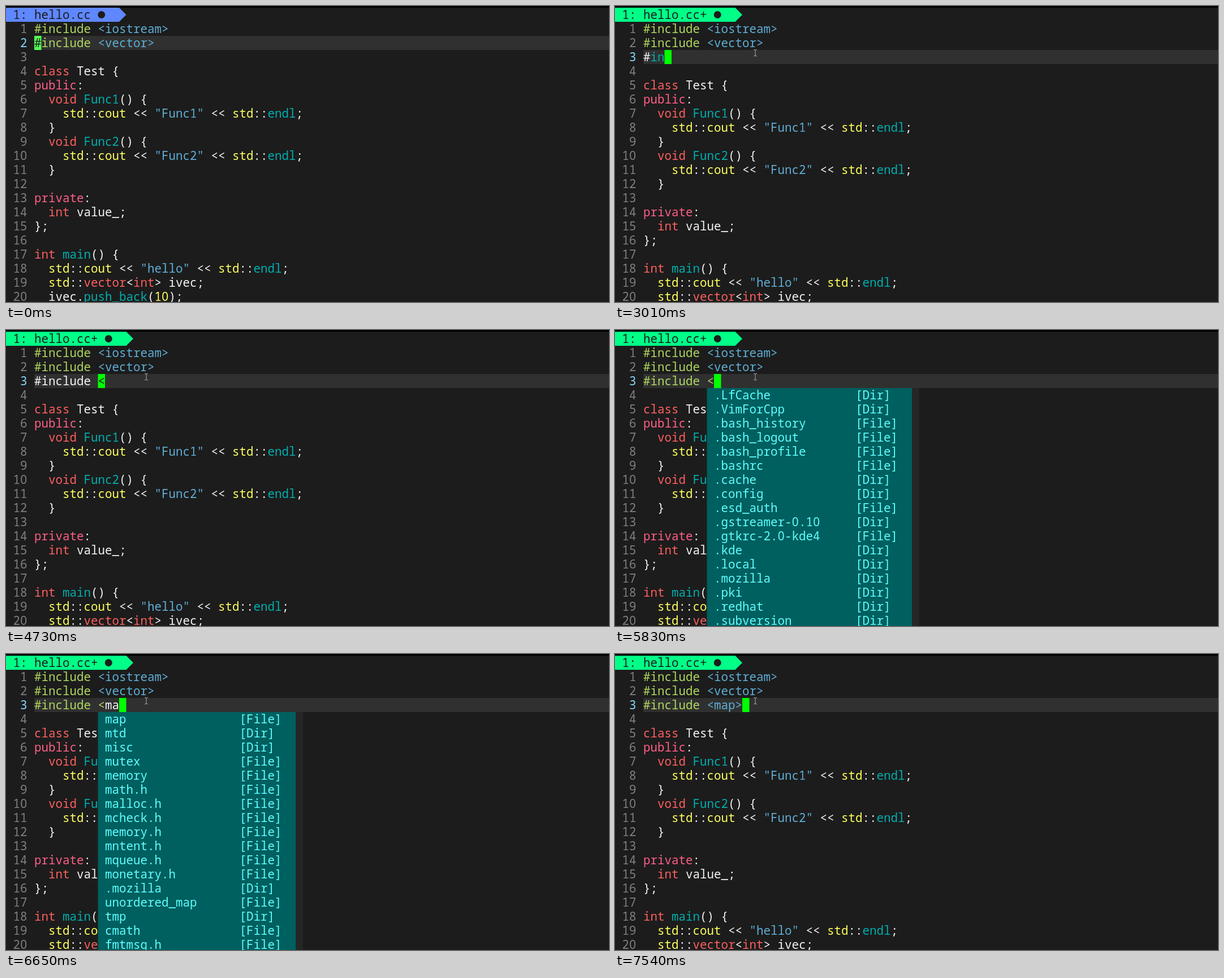
An HTML page with a canvas that plays this animation: 1066x525 px, repeating every 8000 ms.

```html
<!DOCTYPE html>
<html lang="en">
<head>
<meta charset="utf-8">
<title>Typing an include</title>
<style>
html, body { margin: 0; width: 100%; height: 100%; overflow: hidden; background: #1c1c1c; }
canvas { display: block; }
</style>
</head>
<body>
<canvas id="stage" width="1066" height="525"></canvas>
<script>
const ctx = document.getElementById('stage').getContext('2d', { alpha: false });
const CELL = 12.5, ROW = 25, TOP = 3, LOOP = 8000, GUTTER = 4;
const MONO = '20.83px "Noto Sans Mono", "DejaVu Sans Mono", monospace';
const PLAIN_ZERO = '20.83px "Noto Sans", "Open Sans", sans-serif';
const BG = '#1c1c1c', WHITE = '#f4f4f4', GREEN = '#afd75f', BLUE = '#5fafd7',
      RED = '#ff5f5f', PINK = '#ff5f87', YELLOW = '#ffff5f', TEAL = '#00afaf';

const code = `#include <iostream>
#include <vector>

class Test {
public:
  void Func1() {
    std::cout << "Func1" << std::endl;
  }
  void Func2() {
    std::cout << "Func2" << std::endl;
  }

private:
  int value_;
};

int main() {
  std::cout << "hello" << std::endl;
  std::vector<int> ivec;
  ivec.push_back(10);`.split('\n');

const rules = [
  [/^#include/, GREEN],
  [/^(<\w+>$|"[^"]*")/, BLUE],
  [/^(class|void|int|vector)\b/, RED],
  [/^(public|private)\b/, PINK],
  [/^(std|cout|10)\b/, YELLOW],
  [/^(Func\d|main|endl|push_back)\b/, TEAL],
  [/^(\w+|.)/, WHITE],
];

// Each line becomes a list of [text, colour] spans.
function highlight(line) {
  const spans = [];
  while (line) {
    const [rule, colour] = rules.find(([r]) => r.test(line));
    const text = line.match(rule)[0];
    spans.push([text, colour]);
    line = line.slice(text.length);
  }
  return spans;
}
const codeSpans = code.map(highlight);

function typedSpans(text, t) {
  if (text.endsWith('>')) return highlight(text);
  if (t >= 5750) return [[text.slice(0, 10), GREEN], [text.slice(10), WHITE]];
  if (text.length >= 8) return [[text, WHITE]];
  return [[text.slice(0, 1), WHITE], [text.slice(1), TEAL]];
}

// A trailing slash marks a directory.
const menu = (left, end, items, kind) => ({ left, end, kind, items: items.split(' ') });
const menus = {
  in: menu(4, 29, 'int include ivec main iostream private std::endl push_back', 'ID'),
  inclu: menu(4, 30, 'include include_next ifndef include_once', 'ID'),
  all: menu(13, 42, '.LfCache/ .VimForCpp/ .bash_history .bash_logout .bash_profile .bashrc ' +
    '.cache/ .config/ .esd_auth .gstreamer-0.10/ .gtkrc-2.0-kde4 .kde/ .local/ .mozilla/ ' +
    '.pki/ .redhat/ .subversion/'),
  m: menu(13, 41, 'map mtd/ misc/ mutex memory math.h malloc.h mcheck.h memory.h mntent.h ' +
    'mqueue.h monetary.h .mozilla/ unordered_map tmp/ cmath fmtmsg.h'),
  ma: menu(13, 41, 'map math.h malloc.h monetary.h .mozilla/ unordered_map cmath fmtmsg.h ' +
    'tgmath.h semaphore.h ctgmath cmalloc.h numa.h stdmath.h netmap.h pmap.h format.h'),
  map: menu(13, 40, 'map unordered_map semaphore.h netmap.h pmap.h'),
};

// [start time, text of the new line, open menu]
const steps = [
  [2060, ''], [2380, '#'], [2780, '#i'], [3010, '#in'], [3090, '#in', 'in'], [3170, '#inc'],
  [4030, '#incl'], [4180, '#inclu'], [4260, '#inclu', 'inclu'], [4340, '#includ'],
  [4420, '#include'], [4500, '#include '], [4730, '#include <'], [5750, '#include <'],
  [5830, '#include <', 'all'], [6440, '#include <m', 'all'], [6510, '#include <m', 'm'],
  [6650, '#include <ma', 'm'], [6760, '#include <ma', 'ma'], [6830, '#include <map', 'ma'],
  [6910, '#include <map', 'map'], [7540, '#include <map>'],
];

function box(col, row, cols, colour, rows = 1) {
  ctx.fillStyle = colour;
  ctx.fillRect(col * CELL, TOP + row * ROW, cols * CELL, rows * ROW);
}

function write(text, col, row, colour) {
  ctx.fillStyle = colour;
  [...text].forEach((ch, i) => {
    ctx.font = ch === '0' ? PLAIN_ZERO : MONO;
    ctx.fillText(ch, (col + i + 0.5) * CELL, TOP + row * ROW + 19.5);
  });
}

function writeSpans(spans, row) {
  let col = GUTTER;
  for (const [text, colour] of spans) {
    write(text, col, row, colour);
    col += text.length;
  }
}

function drawTab(edited) {
  const name = edited ? 'hello.cc+' : 'hello.cc', colour = edited ? '#00ff87' : '#5f87ff';
  const end = (GUTTER + name.length + 4) * CELL;
  ctx.fillStyle = colour;
  ctx.beginPath();
  ctx.moveTo(0, TOP);
  ctx.lineTo(end, TOP);
  ctx.lineTo(end + CELL, TOP + ROW / 2);
  ctx.lineTo(end, TOP + ROW);
  ctx.lineTo(0, TOP + ROW);
  ctx.fill();
  write('1: ' + name, 1, 0, BG);
  ctx.beginPath();
  ctx.arc(end - 2.5 * CELL, TOP + ROW / 2, 6.5, 0, 7);
  ctx.fill();
}

function drawMenu({ left, end, kind, items }, selected) {
  box(left, 4, end - left, '#005f5f', items.length);
  if (items.length > 16) box(end, 4, 1, '#262626', items.length);
  if (selected) box(left, 4, end - left, '#008787');
  items.forEach((item, i) => {
    const label = kind || (item.endsWith('/') ? 'Dir' : 'File');
    write(item.replace(/\/$/, ''), left + 1, 4 + i, '#5fffff');
    write(`[${label}]`, end - (kind ? 6 : 8), 4 + i, '#5fffff');
  });
}

function drawMouse(t) {
  if (t < 70) return;
  let x, y;
  if (t < 900) {
    const u = Math.min(10, Math.floor((t - 70) / 75)) / 10, k = u * (2 - u);
    x = 983 - 729 * k;
    y = 520 - 423 * k;
  } else {
    const n = Math.min(3, Math.floor((t - 820) / 80));
    x = 254 - 2 * n;
    y = 97 - 14 * n / 3;
  }
  ctx.strokeStyle = '#a8a8a8';
  ctx.lineWidth = 1;
  ctx.beginPath();
  for (const s of [-1, 1]) {
    ctx.moveTo(x - 3, y + 6 * s);
    ctx.quadraticCurveTo(x, y + 6 * s, x, y + 4 * s);
    ctx.quadraticCurveTo(x, y + 6 * s, x + 3, y + 6 * s);
  }
  ctx.moveTo(x, y - 5);
  ctx.lineTo(x, y + 5);
  ctx.stroke();
}

function drawCursor(t, edited, typed) {
  if (!edited) {
    const row = t < 1990 ? 2 : 3;
    box(GUTTER, row, 1, t < 1060 ? '#55ff55' : '#00ff00');
    if (row === 2) write('#', GUTTER, 2, BG);
    return;
  }
  // The bracket is echoed under the cursor before the cursor moves on.
  const lagging = t >= 4730 && t < 5750;
  const col = GUTTER + typed.length - lagging;
  box(col, 3, 1, '#00ff00');
  if (lagging) write('<', col, 3, BG);
}

function draw(t) {
  const step = steps.findLast(([start]) => t >= start);
  const edited = !!step, [, typed, open] = step || [];
  const lines = codeSpans.slice();
  if (edited) lines.splice(2, 0, typedSpans(typed, t));
  const current = edited ? 3 : 2;

  ctx.fillStyle = BG;
  ctx.fillRect(0, 0, 1066, 525);
  ctx.fillStyle = '#000';
  ctx.fillRect(0, 0, 1066, TOP);
  ctx.textAlign = 'center';
  drawTab(edited);
  box(GUTTER, current, 90, '#303030');
  lines.slice(0, 20).forEach((spans, i) => {
    const row = i + 1;
    write(String(row).padStart(3), 0, row, row === current ? '#87d7ff' : '#808080');
    writeSpans(spans, row);
  });
  drawCursor(t, edited, typed);
  if (open) drawMenu(menus[open], t >= 7140);
  drawMouse(t);
}

const origin = performance.now();
function tick() {
  draw((performance.now() - origin) % LOOP);
  requestAnimationFrame(tick);
}
tick();
</script>
</body>
</html>
```
